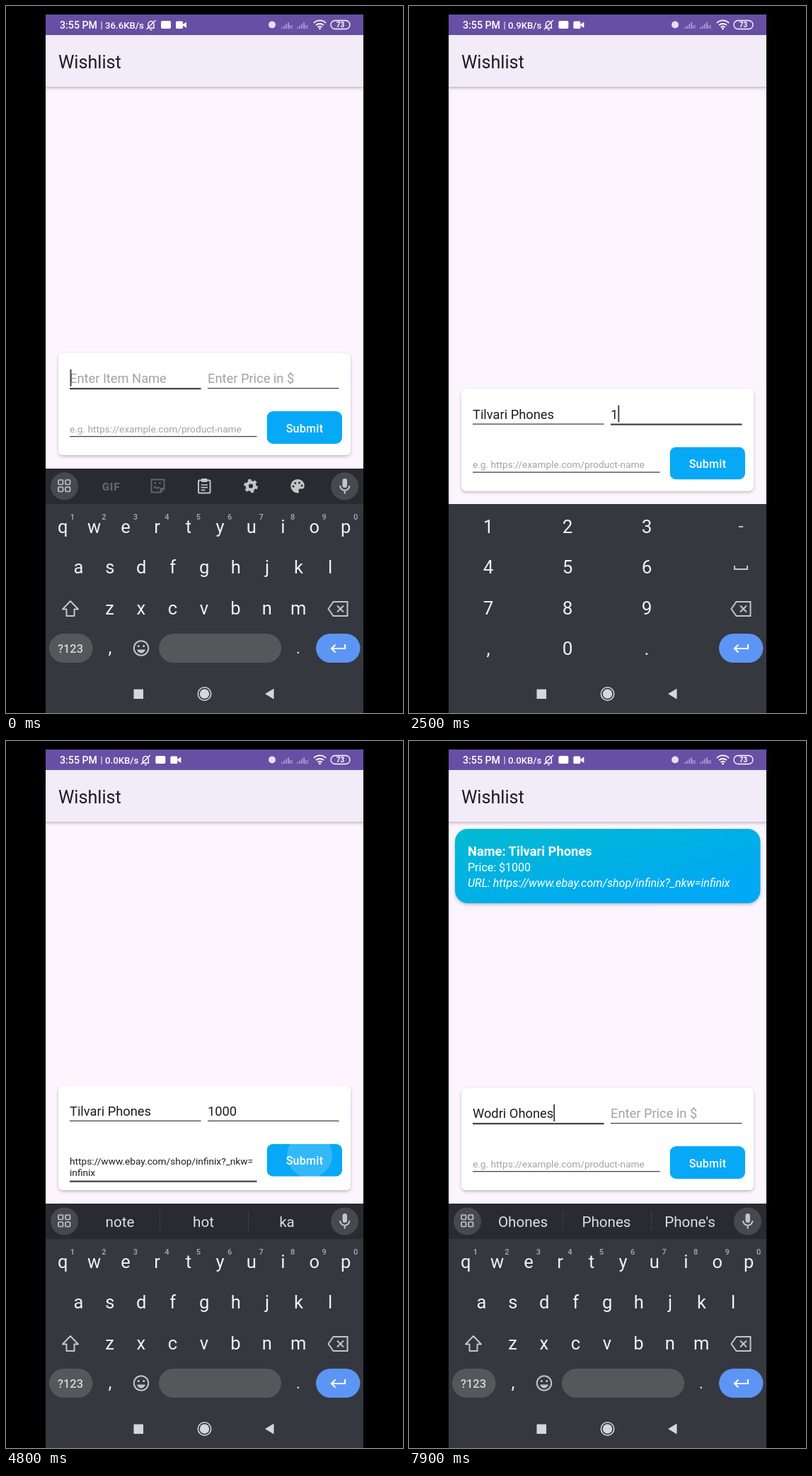
Animation of 561x998 px, one loop 8000 ms. Source, as an HTML page:

```html
<!DOCTYPE html>
<html lang="en">
<head>
<meta charset="utf-8">
<title>Wishlist</title>
<style>
  html, body { margin: 0; width: 100%; height: 100%; overflow: hidden; background: #000; }
  svg { display: block; width: 561px; height: 998px; font-family: Roboto, "Noto Sans", sans-serif; }
  text { white-space: pre; }
  .hide { display: none; }
</style>
</head>
<body>
<svg id="stage" viewBox="0 0 561 998"></svg>
<script>
const LOOP = 8000, STEP = 100;
const BRAND = "Tilvari", RIVAL = "Wodri";
const LINK = ["https://www.ebay.com/shop/infinix?_nkw=", "infinix"];
const FIRST = BRAND + " Phone", SECOND = RIVAL + " Ohones";

// Markup helpers
const attrs = o => Object.entries(o).map(([k, v]) => ` ${k}="${v}"`).join("");
const text = (x, y, size, fill, str, more = {}) =>
  `<text x="${x}" y="${y}" font-size="${size}" fill="${fill}"${attrs(more)}>${str}</text>`;
const mid = (x, y, size, fill, str, more = {}) =>
  text(x, y, size, fill, str, { "text-anchor": "middle", ...more });
const rect = (x, y, w, h, fill, rx = 0, more = {}) =>
  `<rect x="${x}" y="${y}" width="${w}" height="${h}" rx="${rx}" fill="${fill}"${attrs(more)}/>`;
const dot = (x, y, r, fill, more = {}) =>
  `<circle cx="${x}" cy="${y}" r="${r}" fill="${fill}"${attrs(more)}/>`;
const line = (d, color, width = 2, more = {}) =>
  `<path d="${d}" fill="none" stroke="${color}" stroke-width="${width}"${attrs(more)}/>`;
const shape = (d, fill) => `<path d="${d}" fill="${fill}"/>`;
const group = (id, body, more = {}) => `<g id="${id}"${attrs(more)}>${body}</g>`;
const at = (x, y, body) => `<g transform="translate(${x} ${y})">${body}</g>`;

const INK = "#1d1b20", HINT = "#a3a1a6", PALE = "#f1f1f3", SOFT = "#c4c5c9", DIM = "#63656b";
const KEYS = "#363840", BAR = "#292b30", KEY = "#55575b";

function statusBar() {
  const bars = x => [0, 1, 2, 3].map(i =>
    rect(x + i * 3, 30 - i * 2.3, 2, 2 + i * 2.3, "#a394cb")).join("") +
    line(`M${x + 11} 27l5 5m0 -5l-5 5`, "#a394cb", 1.2);
  const bell = at(205, 27,
    line("M-5 4h10M-4 4v-5a4 4.5 0 0 1 8 0v5M-1.5 6.5h3M-6.5 6L6.5 -7", "#fff", 1.4));
  const icons = bell + rect(219, 21, 14, 11, "#fff", 2) +
    rect(240, 21.5, 10, 10.5, "#fff", 1.5) + shape("M250 26l5 -3.5v8.5l-5 -3.5z", "#fff");
  return rect(56, 12, 449, 29, "#674fa3") +
    text(76, 31.5, 14.2, "#fff", "3:55 PM", { "font-weight": 500 }) +
    text(133.5, 31, 13, "#fff", "|") +
    text(140, 31.5, 13.2, "#fff", "", { id: "speed", "font-weight": 500 }) +
    group("statusIcons", icons) +
    dot(376, 26.5, 5, "#e5dff2") + bars(389) + bars(411) +
    line("M435 24a12 12 0 0 1 17 0M438 27.2a8 8 0 0 1 11 0M440.5 30a4.5 4.5 0 0 1 6 0", "#fff", 1.8) +
    dot(443.5, 32, 1.4, "#fff") +
    rect(459, 20.5, 27, 12, "none", 6, { stroke: "#fff", "stroke-width": 1.3 }) +
    mid(472.5, 30.4, 10, "#fff", "73", { "font-weight": 700 });
}

function wishItem() {
  return rect(65, 124, 431.5, 105, "url(#sky)", 18, { filter: "url(#lift)" }) +
    text(83, 162, 18.3, "#fff", `Name: ${BRAND} Phones`, { "font-weight": 700 }) +
    text(83, 184, 16, "#fff", "Price: $1000") +
    text(83, 206, 16, "#fff", "URL: " + LINK.join(""), { "font-style": "italic" });
}

function form() {
  const rule = (id, x, w) => rect(x, 539, w, 1.3, "#44464f", 0, { id });
  const fields =
    text(90, 532, 18.3, HINT, "", { id: "name" }) + rule("nameRule", 90, 185.5) +
    text(285, 532, 18.3, HINT, "", { id: "price" }) + rule("priceRule", 285, 185.5) +
    `<g clip-path="url(#btn)">` + rect(368.5, 572, 106.5, 46, "#07a8f6") +
    dot(429, 588, 30, "#fff", { id: "ripple" }) + `</g>` +
    mid(422, 601.5, 16, "#fff", "Submit", { "font-weight": 500, "letter-spacing": 0.3 });
  return rect(74, 490, 413, 144, "#fff", 7, { id: "card", filter: "url(#lift)" }) +
    group("fields", fields) +
    text(90, 601.5, 13.7, HINT, "", { id: "url" }) + text(90, 613.5, 13.7, INK, LINK[1], { id: "url2" }) +
    rect(90, 607, 264.5, 1.3, "#44464f", 0, { id: "urlRule" }) +
    rect(90, 513, 2, 24, "#44464f", 0, { id: "caret" });
}

const disc = x => dot(x, 678, 19.5, "#47494e");

function toolEnds() {
  const grid = [[74, 669], [84, 669], [74, 679], [84, 679]].map(([x, y]) =>
    rect(x, y, 6.5, 6.5, "none", 1.3, { stroke: SOFT, "stroke-width": 1.7 })).join("");
  const mic = rect(475.5, 667, 6.5, 13, SOFT, 3.3) +
    line("M472 677a6.7 6.7 0 0 0 13.4 0M478.7 684v4.5", SOFT, 2);
  return rect(56, 653, 449, 50, BAR) + disc(82.5) + grid + disc(478.5) + mic;
}

function toolIcons() {
  const sticker = line("M205.500 668.500h18v13l-5 5h-13zM223.500 681h-5v5M209 678q4 4.500 8 1", DIM, 1.9) +
    dot(211, 673.5, 1.4, DIM) + dot(217.5, 673.5, 1.4, DIM);
  const clip = rect(272, 669.5, 16.5, 18, "none", 1.5, { stroke: SOFT, "stroke-width": 2 }) +
    rect(276, 667, 8.500, 5, SOFT, 1) + line("M275.500 676h9.500m-9.500 3.700h9.500m-9.500 3.700h6", SOFT, 1.7);
  const gear = dot(346, 677.5, 5.3, "none", { stroke: SOFT, "stroke-width": 4.4 }) +
    dot(346, 677.5, 8.300, "none", { stroke: SOFT, "stroke-width": 3, "stroke-dasharray": "4.35 4.35" });
  const palette = shape("M412 668a9.700 9.700 0 0 0 0 19.400c2 0 2.400 -1.600 1.600 -3c-.8 -1.600 .2 -3 2 -3h2.500q3.600 0 3.600 -4.500c0 -5 -4.500 -8.900 -9.700 -8.900z", SOFT) +
    [[406, 678], [408.8, 673.5], [414.5, 673], [418, 677]].map(([x, y]) => dot(x, y, 1.5, BAR)).join("");
  return mid(148.5, 683.5, 15, DIM, "GIF", { "font-weight": 900, "letter-spacing": 0.8 }) +
    sticker + clip + gear + palette;
}

function suggestions() {
  const words = [161, 279, 397].map((x, i) => mid(x, 685.5, 20.6, "#dedfe2", "", { id: "word" + i })).join("");
  const rules = line("M217.500 663v28M342.500 663v28", "#3c3e44", 1.2);
  const selfie = shape("M360 681q8 4 13 -2l5 3q-6 9 -18 5z", "#2f9be0") +
    shape("M372 679l3 -5l6 2l-2 6z", "#f3c04b") +
    rect(374, 667, 7, 11, "#4d7f9f", 1.5, { transform: "rotate(12 377 672)" });
  const handset = rect(420.5, 667, 11.5, 20, "#6d7078", 2) + rect(422.5, 669.5, 7.500, 8, "#27313a") +
    rect(424, 671, 2, 2, "#d6534c") + rect(422.5, 680, 7.5, 4, "#9a9da3");
  return words + rules +
    group("emoji", line("M398.500 663v28", "#3c3e44", 1.2) + selfie + handset);
}

const enterKey = rect(438, 886, 62.5, 41, "#5d95f5", 20.5) +
  line("M479 901v6h-19m5.500 -5.500l-5.500 5.500l5.500 5.500", "#fff", 2.1);
const eraser = line("M455.500 851l7 -10h20v20h-20zM468 846.500l9 9m0 -9l-9 9", SOFT, 2);

function letters() {
  const row = (str, x, y) => [...str].map((c, i) => mid(x + i * 44.45, y, 25.5, PALE, c)).join("");
  const digits = [..."1234567890"].map((c, i) => mid(94 + i * 44.45, 724.5, 11, "#abacb1", c, { "font-weight": 500 })).join("");
  const shift = line("M91 840l-11 11.500h5.500v9.500h11v-9.500h5.500z", SOFT, 2, { "stroke-linejoin": "round" });
  const smile = dot(191, 906.5, 10.2, "none", { stroke: SOFT, "stroke-width": 2 }) +
    dot(187.3, 903.5, 1.6, SOFT) + dot(194.7, 903.5, 1.6, SOFT) +
    shape("M185 908.500h12q-2 5 -6 5t-6 -5z", SOFT);
  return rect(56, 703, 449, 241, KEYS) + row("qwertyuiop", 80.2, 743.5) + digits +
    row("asdfghjkl", 102.4, 801) + row("zxcvbnm", 146.5, 858.5) + shift + eraser +
    rect(61, 886, 61.5, 41, KEY, 20.5) + mid(91, 912.5, 16.5, "#d5d6d9", "?123", { "font-weight": 500 }) +
    mid(147, 914, 25, PALE, ",") + smile + rect(216, 886, 173, 41, KEY, 20.5) +
    mid(413, 914, 22, PALE, ".") + enterKey;
}

function numberPad() {
  const cols = [112, 224, 336];
  const keys = ["123", "456", "789", ",0."].map((r, j) =>
    [...r].map((c, i) => mid(cols[i], 743.5 + j * 57.5, 26, PALE, c)).join("")).join("");
  return rect(56, 703, 449, 241, KEYS) + keys + mid(469, 743, 26, SOFT, "-") +
    line("M460 790v5h18v-5", SOFT) + eraser + enterKey;
}

function clipboard() {
  const tile = (x, y, w, h, lines) => rect(x, y, w, h, "#626368", 8) +
    line(`M${x + 22} ${y + 19.5}h-3a3.500 3.500 0 0 0 0 7h3m2 -7h3a3.500 3.500 0 0 1 0 7h-3m-4 -3.500h6`, "#fff", 1.6) +
    lines.map((s, i) => text(x + 14, y + 59 + i * 22.7, 16.1, "#fff", s)).join("");
  const shot = rect(63, 863, 212.5, 90, "#fdf5fe", 8) + rect(67, 862.5, 204, 54.5, "url(#sky)", 8) +
    text(76, 876.5, 8.7, "#fff", `Name: ${BRAND} hot 8`, { "font-weight": 700 }) +
    text(76, 887, 7.600, "#fff", "Price: $100") +
    ["URL: https://www.amazon.com/body-spray/s?k=", "body+spray"].map((s, i) =>
      text(76, 897.5 + i * 9, 7.500, "#fff", s, { "font-style": "italic" })).join("");
  return rect(56, 653, 449, 291, "#25272c") + disc(82.5) + disc(421.5) + disc(478.5) +
    line("M91.500 678h-17m8 -8l-8 8l8 8", "#fff", 2.2) +
    text(115.5, 686.5, 22.8, "#fff", "Clipboard", { "font-weight": 500 }) +
    rect(410, 672, 23, 12, "none", 6, { stroke: "#fff", "stroke-width": 2.2 }) + dot(427, 678, 3.6, "#fff") +
    shape("M469 688v-4.500l11.500 -11.500l4.500 4.500l-11.500 11.500zM481.800 670.700l2.200 -2.200q1 -1 2 0l2.500 2.500q1 1 0 2l-2.200 2.200z", "#fff") +
    text(67.5, 722, 13, "#b6b7bb", "RECENT", { "font-weight": 500, "letter-spacing": 0.5 }) +
    tile(63, 730, 212.5, 123, ["https://www.ebay.com", "/shop/infinix?_nkw=", "infinix"]) +
    tile(285, 730, 212.5, 146, ["https://www.ebay.com", "/b/Xiaomi-Cell-Phones", "-Smartphones/9355/bn", "_315817"]) +
    shot + tile(285, 885, 212.5, 90, ["https://www.amazon"]);
}

function navBar() {
  return rect(56, 944, 449, 54, KEYS) + rect(180.5, 964.5, 13.5, 13.5, "#d6d7da") +
    dot(280.5, 971, 9.200, "none", { stroke: "#d6d7da", "stroke-width": 1.6 }) + dot(280.5, 971, 6.7, "#d6d7da") +
    shape("M366 971l12.500 -7.500v15z", "#d6d7da");
}

const stage = document.getElementById("stage");
stage.innerHTML = `<defs>
  <linearGradient id="sky" x1="0" y1="0" x2="1" y2="1">
    <stop offset="0" stop-color="#04bbd0"/><stop offset=".8" stop-color="#04a9f3"/></linearGradient>
  <filter id="lift" x="-10%" y="-10%" width="120%" height="125%">
    <feDropShadow dx="0" dy="2" stdDeviation="2" flood-color="#000" flood-opacity=".25"/></filter>
  <clipPath id="btn">${rect(368.5, 572, 106.5, 46, "#000", 9)}</clipPath>
  <clipPath id="phone">${rect(56, 12, 449, 986, "#000")}</clipPath></defs>` +
  rect(0, 0, 561, 998, "#000") +
  `<g clip-path="url(#phone)">` + rect(56, 41, 449, 957, "#fdf5fe") +
  rect(50, 41, 461, 73, "#f2ebf8", 0, { filter: "url(#lift)" }) + statusBar() +
  text(74, 88, 25.2, INK, "Wishlist") +
  group("item", wishItem()) + group("form", form()) +
  group("tools", toolEnds() + group("icons", toolIcons()) + group("hints", suggestions())) +
  group("letters", letters()) + group("pad", numberPad()) + group("clips", clipboard()) +
  navBar() + `</g>`;

// Timeline
const $ = id => document.getElementById(id);
const show = (id, on) => $(id).classList.toggle("hide", !on);
const set = (id, o) => Object.entries(o).forEach(([k, v]) => $(id).setAttribute(k, v));
const typed = (str, t, start, gap) =>
  t < start ? "" : str.slice(0, Math.floor((t - start) / gap) + 1);
const lastOf = (list, t) => list.filter(e => e[0] <= t).pop();

const SPEEDS = [[0, "36.6"], [900, "13.0"], [2400, "0.9"], [3700, "0.0"]];
const FOCUS = [[0, "name"], [2300, "price"], [3100, "url"], [5200, "name"]];
const PASTE = 4300, PRESS = 4700, ADDED = 5000;

function fieldsAt(t) {
  if (t >= ADDED) return { name: typed(SECOND, t, 6500, 110), price: "", url: false };
  return {
    name: t >= 1900 ? FIRST + "s" : typed(FIRST, t, 300, 105),
    price: typed("1000", t, 2500, 130),
    url: t >= PASTE
  };
}

function wordsAt(t, name) {
  if (t >= PASTE && t < ADDED) return ["note", "hot", "ka"];
  if (!name || (t >= 2300 && t < ADDED)) return null;
  const word = name.split(" ")[1];
  if (t >= ADDED) return word ? [word, "Phones", "Phone's"] : [name.trim(), RIVAL, "Would"];
  return word ? [word, "Phones", ""] : [name.trim(), BRAND, "Till"];
}

function setField(id, value, hint) {
  $(id).textContent = value || hint;
  set(id, { fill: value ? INK : HINT });
}

function caretAt(t, focus, f) {
  let since = focus[0];
  const changes = [[300, 105, 13], [1900, 1, 1], [2500, 130, 4], [PASTE, 1, 1], [6500, 110, 12]];
  for (const [start, gap, n] of changes)
    if (t >= start) since = Math.max(since, start + gap * Math.min(n - 1, Math.floor((t - start) / gap)));
  const id = focus[1], value = f[id];
  show("caret", (t - since) % 1000 < 500);
  if (id === "url") {
    const x = value ? 90 + $("url2").getComputedTextLength() : 90.5;
    set("caret", { x, y: value ? 601 : 587, height: 18 });
  } else {
    const x = (id === "name" ? 90 : 285) + (value ? $(id).getComputedTextLength() : 0.5);
    set("caret", { x, y: 513, height: 24 });
  }
}

function draw(t) {
  const f = fieldsAt(t), focus = lastOf(FOCUS, t);
  const speed = lastOf(SPEEDS, t)[1];
  $("speed").textContent = speed + "KB/s";
  set("statusIcons", { transform: `translate(${speed.length > 3 ? 0 : -7.700} 0)` });

  show("item", t >= ADDED);
  setField("name", f.name, "Enter Item Name");
  setField("price", f.price, "Enter Price in $");
  setField("url", f.url && LINK[0], "e.g. https://example.com/product-name");
  show("url2", f.url);

  // A two-line link makes the card grow upwards
  const rise = f.url ? -3.3 : 0;
  set("card", { y: 490 + rise, height: 144 - rise });
  set("fields", { transform: `translate(0 ${rise})` });
  set("url", { y: 601.5 + rise });
  for (const id of ["name", "price", "url"]) {
    const y = id === "url" ? (f.url ? 620.5 : 607) : 539;
    set(id + "Rule", { y, height: focus[1] === id ? 2.3 : 1.3 });
  }
  set("form", { transform: `translate(0 ${t >= 2400 && t < 3400 ? 50.5 : 0})` });
  caretAt(t, focus, f);

  const age = t - PRESS;
  show("ripple", age >= 0 && age < 500);
  set("ripple", { r: 18 + age * 0.14, opacity: Math.min(0.18, (500 - age) / 2000) });

  const pad = focus[1] === "price", clips = t >= 3800 && t < PASTE;
  const words = wordsAt(t, f.name);
  show("pad", pad);
  show("clips", clips);
  show("letters", !pad && !clips);
  show("tools", !pad && !clips);
  show("icons", !words);
  show("hints", words);
  if (words) {
    words.forEach((w, i) => $("word" + i).textContent = w);
    show("emoji", !words[2]);
  }
}

const begin = performance.now();
function tick() {
  const t = (performance.now() - begin) % LOOP;
  draw(Math.floor(t / STEP) * STEP);
  requestAnimationFrame(tick);
}
tick();
</script>
</body>
</html>
```
